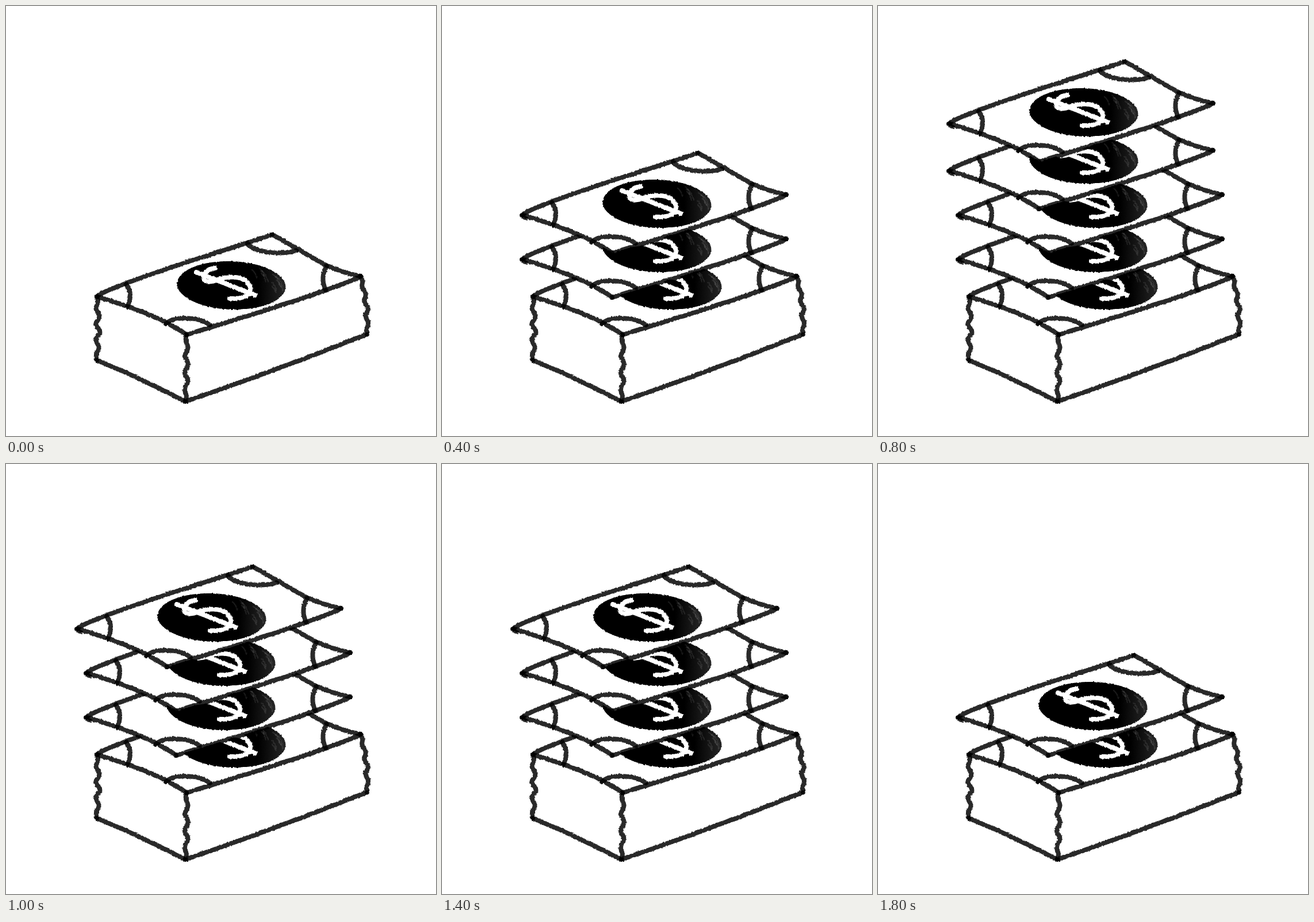
An HTML page for the animation above (2 s loop, 748 px wide and 748 px high).

```html
<!DOCTYPE html>
<html lang="en">
<head>
<meta charset="utf-8">
<title>Stack of bills</title>
<style>
  html, body { margin: 0; width: 100%; height: 100%; overflow: hidden; background: #fff; }
  svg { display: block; width: 100vw; height: 100vh; }
  path { fill: none; stroke-linecap: round; stroke-linejoin: round; }
  .paper { fill: #fff; }
  .ink { stroke: #000; stroke-opacity: .84; stroke-width: 8; }
  .chalk { stroke: #fff; stroke-width: 8; }
  .grain { stroke: #fff; stroke-opacity: .1; stroke-width: 2; }
</style>
</head>
<body>
<svg viewBox="0 0 748 748">
  <defs>
    <filter id="rough" filterUnits="userSpaceOnUse" x="130" y="375" width="520" height="335" color-interpolation-filters="sRGB">
      <feTurbulence type="fractalNoise" baseFrequency=".3" numOctaves="2" seed="4" result="n"/>
      <feDisplacementMap in="SourceGraphic" in2="n" scale="3.5" xChannelSelector="R" yChannelSelector="G"/>
      <feGaussianBlur stdDeviation=".5"/>
    </filter>
    <linearGradient id="disc">
      <stop offset=".75" stop-color="#000"/>
      <stop offset="1" stop-color="#262626"/>
    </linearGradient>
    <g id="face"></g>
  </defs>
  <g id="box" filter="url(#rough)"></g>
  <g id="bills"></g>
</svg>
<script>
const $ = id => document.getElementById(id);

function add(parent, tag, attrs) {
  const el = document.createElementNS('http://www.w3.org/2000/svg', tag);
  for (const k in attrs) el.setAttribute(k, attrs[k]);
  parent.appendChild(el);
  return el;
}

const stroke = (parent, d, cls = 'ink') => add(parent, 'path', { d, class: cls });
const line = pts => 'M' + pts.map(p => p.map(v => v.toFixed(1))).join('L');

let seed = 7;
function rand() {
  seed = seed * 16807 % 2147483647;
  return seed / 2147483647;
}

// Hand-drawn edge: bows sideways, most strongly at peak, with an optional ripple
function edge([x1, y1], [x2, y2], bow, peak = .5, ripple = 0) {
  const dx = x2 - x1, dy = y2 - y1, len = Math.hypot(dx, dy);
  const power = Math.log(.5) / Math.log(peak), steps = 32;
  return Array.from({ length: steps + 1 }, (_, i) => {
    const t = i / steps;
    const fade = Math.sqrt(Math.abs(Math.sin(Math.PI * t)));
    const off = bow * Math.sin(Math.PI * t ** power)
      + fade * (ripple * Math.sin(8 * Math.PI * t) + rand() - .5);
    return [x1 + dx * t - dy / len * off, y1 + dy * t + dx / len * off];
  });
}

// Corners of the stack: top face, then the base
const left = [158, 505], back = [463, 398], right = [617, 470], front = [314, 572];
const lowLeft = [158, 616], lowFront = [312, 688], lowRight = [628, 571];

function drawFace(g) {
  const rim = [
    edge(left, back, -5, .3),
    edge(back, right, 8, .65),
    edge(right, front, -4, .31),
    edge(front, left, 6.5, .4)
  ];
  stroke(g, line(rim.flat()), 'paper');

  add(g, 'ellipse', { cx: 392, cy: 486, rx: 94.5, ry: 42, transform: 'rotate(2 392 486)', fill: 'url(#disc)' });
  for (let i = 0; i < 12; i++) {
    const a = -1 + i * .1, r = .7 + .2 * rand();
    stroke(g, `M${392 + 94 * r * Math.cos(a)},${484 + 42 * r * Math.sin(a)}q6,5 8,${8 + 8 * rand()}`, 'grain');
  }
  stroke(g, 'M331,463L433,503', 'chalk');
  stroke(g, 'M364,456C346,457 342,470 345,476S362,479 372,475S406,469 417,478S428,501 414,506S396,508 389,509', 'chalk');

  rim.forEach(pts => stroke(g, line(pts)));
  stroke(g, 'M209,484Q222,500 211,523');
  stroke(g, 'M420,413C432,429 480,434 505,425');
  stroke(g, 'M558,452Q546,472 556,494');
  stroke(g, 'M278,553C292,539 335,540 355,555');
}

function drawBox(g) {
  stroke(g, line([left, front, right, lowRight, lowFront, lowLeft]), 'paper');
  add(g, 'use', { href: '#face' });
  [
    edge(left, lowLeft, -2, .5, -3.5),
    edge(front, lowFront, -1, .5, 3),
    edge(right, lowRight, -4, .5, -2.5),
    edge(lowLeft, lowFront, -2),
    edge(lowFront, lowRight, 2)
  ].forEach(pts => stroke(g, line(pts)));
}

drawFace($('face'));
drawBox($('box'));

const bills = [[-18, -65], [-18, -142], [-34, -219], [-34, -301]].map(([x, y]) => {
  const g = add($('bills'), 'g', { transform: `translate(${x} ${y})` });
  const sheet = add(g, 'g', { filter: 'url(#rough)' });
  add(sheet, 'use', { href: '#face' });
  stroke(sheet, 'M157,506l6,5');
  return g;
});

const STEP = 200;
const counts = [0, 1, 2, 3, 4, 3, 2, 3, 4, 1];

function render(ms) {
  const n = counts[Math.floor(ms / STEP) % counts.length];
  bills.forEach((b, i) => b.setAttribute('visibility', i < n ? 'visible' : 'hidden'));
}

const start = performance.now();
function tick() {
  render(performance.now() - start);
  requestAnimationFrame(tick);
}
tick();
</script>
</body>
</html>
```
